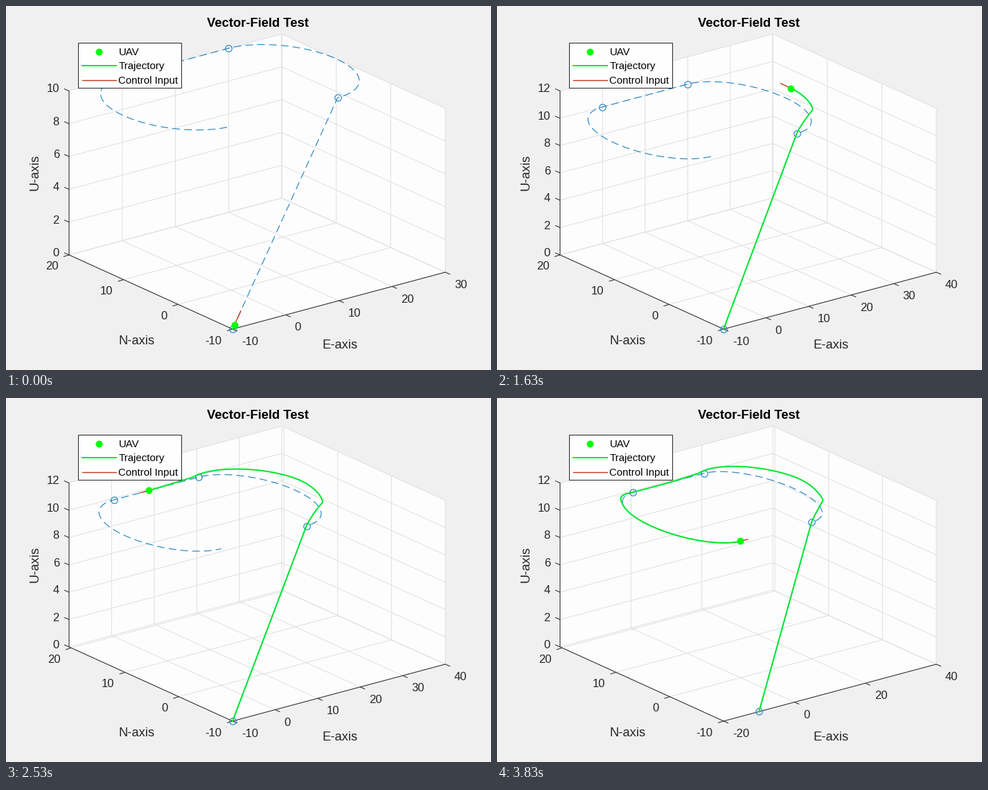
Write a matplotlib script that moves like this. It is 700 px wide and 525 px high and loops after 3.86 s.

```python
import numpy as np
import matplotlib.pyplot as plt
from matplotlib.animation import FuncAnimation
from matplotlib.collections import LineCollection
from matplotlib.patches import Polygon, Rectangle

W, H, DPI = 700, 525, 120
LOOP, STEP = 3860, 20
PX = 72 / DPI

BACK, WALL, GRID, INK = "#f0f0f0", "#fdfdfe", "#dfdfe1", "#262626"
BLUE, RED, GREEN, DOT = "#1a7fc0", "#c43a1a", "#00e632", "#00ff00"

plt.rcParams["font.family"] = "Liberation Sans"

# Screen position of the front corner and the three box edges
ORIGIN = np.array([327.0, 466.0])
EDGES = np.array([[307.0, -82.0], [-236.0, -107.0], [0.0, -236.5]])

# Planned path: a climb, a half turn, a straight leg and a second half turn
RADIUS, ALT = 10, 10
points = np.array([(-10, -10, 0), (20, 0, ALT), (20, 20, ALT), (0, 20, ALT)], float)
climb = np.linalg.norm(points[1] - points[0])
turn = np.pi * RADIUS
leg = 20


def half_turn(east, start):
    a = np.radians(start + np.arange(181))
    return np.column_stack([east + RADIUS * np.cos(a), 10 + RADIUS * np.sin(a),
                            np.full(a.size, float(ALT))])


plan = np.vstack([points[:1], half_turn(20, -90), half_turn(0, 90)])
dist = np.r_[0, np.cumsum(np.linalg.norm(np.diff(plan, axis=0), axis=1))]


def bump(x, center, width, height):
    return height * np.exp(-((x - center) / width) ** 2)


def unit(v):
    return v / np.linalg.norm(v, axis=1)[:, None]


def fly(k):
    """Positions at time steps k: the plan at unit speed plus the overshoot."""
    s = .6 + 1.003 * k
    s = s - bump(s, 57, 16, 2.5)
    pos = np.column_stack([np.interp(s, dist, c) for c in plan.T])
    ahead = unit(np.gradient(pos, axis=0))
    x = s - climb
    # Swing outwards in the turns
    side = (bump(x, 10, 3, .45) + bump(x, turn, 6, .4)
            + bump(x, turn + leg + 3.6, 2.5, .4))
    pos[:, 0] += side * ahead[:, 1]
    pos[:, 1] -= side * ahead[:, 0]
    # Overshoot in height after the climb, fading through the first turn
    x = np.clip(x, 0, 32.5)
    rise = 1 - np.exp(-x / 2.2)
    pos[:, 2] += rise * (1.2 * np.cos(np.pi * x / 65) - bump(x, 8.8, 3.4, .45))
    return pos


SUB = 4
track = fly(np.arange(115 * SUB + 1) / SUB)
tips = track + 2 * unit(np.gradient(track, axis=0))

# Stage
fig = plt.figure(figsize=(W / DPI, H / DPI), dpi=DPI, facecolor=BACK)
ax = fig.add_axes([0, 0, 1, 1])
ax.set_xlim(0, W)
ax.set_ylim(H, 0)
ax.axis("off")


def line(color, width, z, **kw):
    return ax.plot([], [], color=color, lw=width * PX, zorder=z, **kw)[0]


def write(x, y, s, size, color=INK, **kw):
    return ax.text(x, y, s, fontsize=size, color=color, va="baseline", **kw)


e, n, u = EDGES
ax.add_patch(Polygon([ORIGIN, ORIGIN + e, ORIGIN + e + u, ORIGIN + e + n + u,
                      ORIGIN + n + u, ORIGIN + n], fc=WALL, ec="none", zorder=0))
frame = np.array([ORIGIN + e, ORIGIN, ORIGIN + n, ORIGIN + n + u])
ax.plot(*frame.T, color=INK, lw=PX, zorder=2)

grid = ax.add_collection(LineCollection([], colors=GRID, linewidths=PX, zorder=1))
ticks = ax.add_collection(LineCollection([], colors=INK, linewidths=PX, zorder=2))
plan_line = line(BLUE, 1.1, 3, dashes=(10, 5.5))
rings = line(BLUE, 1.1, 3, ls="", marker="o", ms=9.5 * PX, mfc="none", mew=1.1 * PX)
trail = line(GREEN, 2, 4)
control = line(RED, 1.4, 5)
uav = line(DOT, 1, 6, ls="", marker="o", ms=10 * PX, mew=0)

write(363, 30.5, "Vector-Field Test", 11, "black", weight="bold", ha="center")
write(482.5, 494, "E-axis", 11, ha="center")
write(189, 488, "N-axis", 11, ha="center")
write(47, 240, "U-axis", 11, ha="center", rotation=90, rotation_mode="anchor")

# Legend
ax.add_patch(Rectangle((104, 53), 149, 65, fc="#fefefe", ec=INK, lw=PX, zorder=10))
ax.plot(133.5, 65.5, "o", color=DOT, ms=10 * PX, mew=0, zorder=11)
for row, (s, color, width) in enumerate([("UAV", DOT, 0), ("Trajectory", GREEN, 2),
                                         ("Control Input", RED, 1.4)]):
    y = 65.5 + 20.7 * row
    if width:
        ax.plot([109.5, 158.5], [y, y], color=color, lw=width * PX, zorder=11)
    write(162.5, y + 5.3, s, 9, "black", zorder=11)

labels = [write(0, 0, "", 10, ha="left" if i < 6 else "right") for i in range(17)]


def limits(k, now):
    """Axis limits grow as the flight reaches beyond them."""
    lo = np.array([-20 if k >= 98 else -10, -10, 0], float)
    hi = np.array([40 if k >= 49 else 30,
                   max(20, track[:now + 1, 1].max()),
                   12 if tips[:now + 1, 2].max() > ALT else 10], float)
    return lo, hi


def draw_axes(lo, hi, project):
    es = np.arange(lo[0], hi[0] + 1, 20 if lo[0] == -20 else 10)
    ns = np.arange(-10, 21, 10)
    us = np.arange(0, hi[2] + 1, 2)
    far_e, far_n, top = hi
    walls = [[(v, -10, 0), (v, far_n, 0), (v, far_n, top)] for v in es]
    walls += [[(lo[0], v, 0), (far_e, v, 0), (far_e, v, top)] for v in ns]
    walls += [[(lo[0], far_n, v), (far_e, far_n, v), (far_e, -10, v)] for v in us]
    grid.set_segments([project(w) for w in walls])

    marks = []
    for t in labels:
        t.set_text("")
    sides = [(0, es, lambda v: (v, -10, 0), (7, 3), (13, 23)),
             (6, ns, lambda v: (lo[0], v, 0), (-8, 2.5), (-15.5, 21.5)),
             (10, us, lambda v: (lo[0], far_n, v), (-7, -3), (-14, 2))]
    for first, values, place, stub, shift in sides:
        for t, v in zip(labels[first:], values):
            p = project([place(v)])[0]
            marks.append([p, p + stub])
            t.set_position(p + shift)
            t.set_text(f"{v:.0f}")
    ticks.set_segments(marks)


def update(i):
    # The flight advances 30 steps a second, slower than the drawing rate
    k = int((i * STEP + STEP / 2 + 5) * 3 / 100)
    now = k * SUB
    lo, hi = limits(k, now)

    def project(p):
        return ORIGIN + (np.asarray(p, float) - lo) / (hi - lo) @ EDGES

    draw_axes(lo, hi, project)
    plan_line.set_data(*project(plan).T)
    rings.set_data(*project(points).T)
    trail.set_data(*project(np.vstack([points[:1], track[:now + 1]])).T)
    uav.set_data(*project(track[now:now + 1]).T)
    control.set_data(*project([track[now], tips[now]]).T)
    return []


anim = FuncAnimation(fig, update, frames=LOOP // STEP, interval=STEP,
                     repeat=True, repeat_delay=0, blit=False)
plt.show()
```
